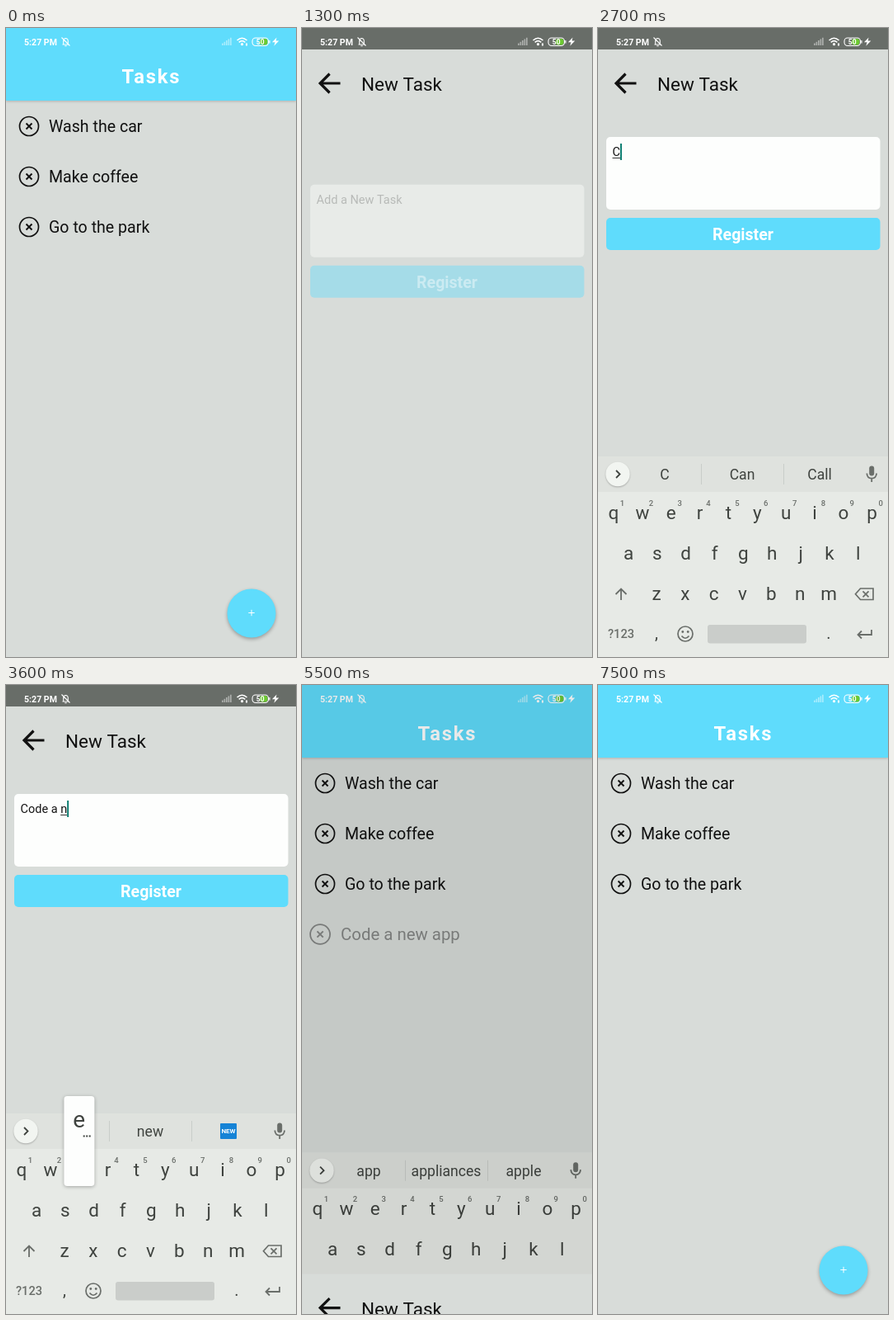
An HTML page with a canvas that plays this animation: 352 by 762 pixels, repeating every 7700 ms.

```html
<!DOCTYPE html>
<html lang="en">
<head>
<meta charset="utf-8">
<title>Tasks</title>
<style>
html, body { margin: 0; width: 100%; height: 100%; overflow: hidden; background: #d8dcd9; }
canvas { display: block; width: 352px; height: 762px; }
</style>
</head>
<body>
<canvas id="stage"></canvas>
<script>
const W = 352, H = 762, LOOP = 7700;
const BLUE = '#5fdcfc', GRAY = '#d8dcd9', INK = '#3f433f', ICON = '#6a6e6a';
const canvas = document.getElementById('stage');
const ctx = canvas.getContext('2d');
const dpr = window.devicePixelRatio || 1;
canvas.width = W * dpr;
canvas.height = H * dpr;

// Timeline, ms
const PUSH = 1080, FOCUS = 1856, TYPE = 2610, KEY_STEP = 122, KEY_HOLD = 90;
const REGISTER = 5150, POP = 5380, REMOVE = 6850;
const MESSAGE = 'Code a new app';
const ROWS = ['qwertyuiop', 'asdfghjkl', 'zxcvbnm'];
const ROW_X = [19, 37, 71], KEY_W = 34.85;
const rowY = row => 587 + row * 49.3;

const SUGGESTIONS = {
  '': ['the', 'new', 'for'],
  C: ['C', 'Can', 'Call'],
  Co: ['Co', 'Come', 'Could'],
  Cod: ['Cod', 'Code', 'Codes'],
  Code: ['Code', 'Codes', 'Coded'],
  a: ['a', 'and', 'as'],
  n: ['n', 'new', '#'],
  ne: ['ne', 'new', 'need'],
  new: ['new', 'news', '#'],
  ap: ['ap', 'app', 'apple'],
  app: ['app', 'appliances', 'apple']
};

const clamp = v => Math.max(0, Math.min(1, v));
const within = (t, from, to) => t >= from && t < to;
function smooth(t, start, duration) {
  const x = clamp((t - start) / duration);
  return x * x * (3 - 2 * x);
}
function inOut(t, start, duration) {
  const x = clamp((t - start) / duration);
  return x < 0.5 ? 2 * x * x : 1 - 2 * (1 - x) ** 2;
}

function layer(alpha, x, y, draw) {
  ctx.save();
  ctx.globalAlpha *= alpha;
  ctx.translate(x, y);
  draw();
  ctx.restore();
}
function text(value, x, y, size, color, { weight = 400, align = 'left', spacing = 0 } = {}) {
  ctx.font = `${weight} ${size}px Roboto, sans-serif`;
  ctx.textAlign = align;
  ctx.letterSpacing = spacing + 'px';
  ctx.fillStyle = color;
  ctx.fillText(value, x, y);
}
function rect(x, y, w, h, color, radius = 0) {
  ctx.fillStyle = color;
  ctx.beginPath();
  ctx.roundRect(x, y, w, h, radius);
  ctx.fill();
}
function disc(x, y, r, color) {
  rect(x - r, y - r, 2 * r, 2 * r, color, r);
}
function stroke(path, color, width) {
  ctx.strokeStyle = color;
  ctx.lineWidth = width;
  ctx.stroke(new Path2D(path));
}
function fill(path, color) {
  ctx.fillStyle = color;
  ctx.fill(new Path2D(path));
}
function ring(x, y, r, color, width) {
  ctx.strokeStyle = color;
  ctx.lineWidth = width;
  ctx.beginPath();
  ctx.arc(x, y, r, 0, 2 * Math.PI);
  ctx.stroke();
}
function shadow(blur, dy, alpha, draw) {
  ctx.save();
  ctx.shadowColor = `rgba(0,0,0,${alpha})`;
  ctx.shadowBlur = blur * dpr;
  ctx.shadowOffsetY = dy * dpr;
  draw();
  ctx.restore();
}

function statusBar() {
  const white = '#fff';
  text('5:27 PM', 22, 20.5, 10.6, white, { weight: 700 });
  stroke('M68.5 20H76.5M69.7 20V16Q69.7 12.7 72.5 12.5Q75.3 12.7 75.3 16V20M71.3 21.7H73.7M67.5 11.5L77.5 21.5', white, 1.1);
  for (let i = 0; i < 5; i++) {
    rect(262 + i * 2.5, 18.5 - i * 1.7, 1.7, 2.5 + i * 1.7, 'rgba(255,255,255,.45)');
  }
  stroke('M280.5 15Q286.5 9.5 292.5 15M282.7 17.3Q286.5 14 290.3 17.3', white, 1.6);
  disc(286.5, 19.7, 1.6, white);
  rect(291, 18.5, 2, 3, white);
  rect(308, 13, 9.5, 7.5, '#6cc930', 3);
  ctx.strokeStyle = white;
  ctx.lineWidth = 1.1;
  ctx.beginPath();
  ctx.roundRect(299, 12, 19.5, 9.5, 4);
  ctx.stroke();
  rect(319.3, 15, 1.2, 3.5, white);
  text('50', 308.7, 20, 8.5, white, { weight: 700, align: 'center' });
  fill('M328.5 11.5L323 17.3H326.6L325.3 21.8L331.3 15.6H327.7Z', white);
}

function taskRow(label, y) {
  ring(28, y, 11.5, '#111', 1.7);
  stroke(`M24.5 ${y - 3.5}l7 7m0 -7l-7 7`, '#111', 1.9);
  text(label, 52, y + 7, 19.6, '#111');
}

function tasksScreen(t) {
  rect(0, 0, W, H, GRAY);
  shadow(3, 1, 0.2, () => rect(0, 0, W, 88, BLUE));
  text('Tasks', 140.6, 67, 23.8, '#fff', { weight: 700, spacing: 1.8 });
  statusBar();
  ['Wash the car', 'Make coffee', 'Go to the park'].forEach((label, i) => taskRow(label, 119 + 61 * i));

  const shown = inOut(t, POP - 40, 350);
  const gone = inOut(t, REMOVE, 250);
  if (shown > 0 && gone < 1) {
    const pressed = within(t, REMOVE - 150, REMOVE + 250) ? 0.3 : 1;
    layer(shown * (1 - gone) * pressed, W / 2, 302, () => {
      const scale = 1 + 0.07 * (1 - shown);
      ctx.scale(scale, scale);
      ctx.translate(-W / 2, 0);
      taskRow(MESSAGE, 0);
    });
  }

  layer(within(t, 880, PUSH + 100) ? 0.2 : 1, 298, 709, () => {
    shadow(4, 2, 0.3, () => disc(0, 0, 29.5, BLUE));
    stroke('M-3.7 -.5H3.7M0 -4.2V3.2', '#fff', 1);
  });
}

function typedState(t) {
  const count = Math.floor((t - TYPE - KEY_HOLD) / KEY_STEP) + 1;
  const typed = MESSAGE.slice(0, Math.max(0, count));
  const next = Math.floor((t - TYPE) / KEY_STEP);
  const held = t >= TYPE && (t - TYPE) % KEY_STEP < KEY_HOLD ? MESSAGE[next] || '' : '';
  return { typed, held, word: typed.split(' ').pop() };
}

function input(t, { typed, word }) {
  rect(10, 132, 332.5, 88, '#fdfefd', 5);
  if (!typed) text('Add a New Task', 17.5, 155, 14.5, '#767976');
  text(typed, 17.5, 155, 14.5, '#151515');
  const end = 17.5 + ctx.measureText(typed).width;
  const start = end - ctx.measureText(word).width;
  if (word) rect(start, 157, end - start, 1, '#333');

  const lastKey = TYPE + KEY_HOLD + KEY_STEP * (MESSAGE.length - 1);
  const typing = within(t, TYPE, lastKey);
  const since = t - (t < TYPE ? FOCUS : lastKey);
  if (t >= FOCUS && (typing || since % 1200 < 600)) rect(end, 140, 2, 20, '#0b7d70');
}

function formScreen(t, state) {
  rect(0, 26, W, H - 26, GRAY);
  stroke('M46.5 67H22M33.5 55.5L22 67L33.5 78.5', '#111', 3.2);
  text('New Task', 72, 76, 22.5, '#111');
  const shown = inOut(t, PUSH + 60, 350);
  layer(shown, 0, 100 * (1 - shown), () => {
    input(t, state);
    layer(t >= REGISTER ? 0.2 : 1, 0, 0, () => {
      rect(10, 230, 332.5, 39, BLUE, 5);
      text('Register', 176, 257, 19.6, '#fff', { weight: 700, align: 'center' });
    });
  });
}

function toolbar() {
  stroke('M62.5 533.5H76.5V543L71.5 548H62.5ZM76 542.5H71.5V548M66 541Q69 545 72 541', ICON, 1.7);
  rect(65.5, 536.5, 2, 2, ICON);
  rect(71.5, 536.5, 2, 2, ICON);
  text('GIF', 119, 545.5, 13.5, ICON, { weight: 900, align: 'center', spacing: 0.8 });
  ring(169.5, 540.5, 4.8, ICON, 3.6);
  for (let i = 0; i < 6; i++) {
    layer(1, 169.5, 540.5, () => {
      ctx.rotate(i * Math.PI / 3);
      rect(-2, -8.5, 4, 4, ICON);
    });
  }
  rect(212, 533, 16, 16, ICON, 1.5);
  rect(250, 530, 1, 21, '#c3c7c3');
  [-6.5, 0, 6.5].forEach(dx => disc(282 + dx, 540.5, 2, ICON));
}

function suggestions(word) {
  [125, 225].forEach(x => rect(x, 528, 1, 25, '#c9cdc9'));
  (SUGGESTIONS[word] || []).forEach((label, i) => {
    const x = 81 + 94 * i;
    if (label === '#') {
      rect(x - 9, 531, 20, 19, '#1583d6', 1);
      text('NEW', x + 1, 543.3, 8, '#fff', { weight: 700, align: 'center' });
    } else {
      text(label, x, 547, 17.6, INK, { align: 'center' });
    }
  });
}

function keyPopup(key) {
  const row = ROWS.findIndex(keys => keys.includes(key.toLowerCase()));
  if (row < 0) return;
  const x = ROW_X[row] + KEY_W * ROWS[row].indexOf(key.toLowerCase());
  const y = rowY(row);
  shadow(4, 1, 0.3, () => rect(x - 18.3, y - 89, 37, 109, '#fdfefd', 4));
  text(key, x, y - 51, 28, INK, { align: 'center' });
  [6, 9.5, 13].forEach(dx => rect(x + dx - 1, y - 41.5, 2, 2, INK));
}

function keyboard({ typed, held, word }) {
  const upper = !typed;
  rect(0, 519, W, H - 519, '#e7eae6');
  rect(0, 519, W, 43, '#dfe2de');
  shadow(2, 1, 0.25, () => disc(24, 540.5, 14.7, '#f2f5f1'));
  stroke(upper ? 'M26.5 536L22 540.5L26.5 545' : 'M22 536L26.5 540.5L22 545', INK, 1.8);
  if (upper) toolbar();
  else suggestions(word);
  rect(329.2, 530.5, 6, 12, ICON, 3);
  stroke('M326.3 539.5Q326.7 545.5 332.2 545.7Q337.7 545.5 338.1 539.5M332.2 545.5V550', ICON, 1.8);

  ROWS.forEach((keys, row) => [...keys].forEach((key, i) => {
    const x = ROW_X[row] + KEY_W * i;
    text(upper ? key.toUpperCase() : key, x, rowY(row) + (upper ? 8 : 7.5), 22.5, INK, { align: 'center' });
    if (row === 0) text((i + 1) % 10, x + 10.5, 578.5, 9.5, ICON, { weight: 500, align: 'center' });
  }));

  stroke('M28 693V680M21.5 686L28 679.5L34.5 686', ICON, 1.8);
  stroke('M318.5 679H334V692.5H318.5L312.5 685.8ZM321.5 682.3l7 7m0 -7l-7 7', ICON, 1.7);
  text('?123', 12, 739, 14.6, ICON, { weight: 500 });
  text(',', 71, 740, 20, INK, { align: 'center' });
  ring(106, 734, 9, ICON, 1.7);
  disc(102.8, 731.5, 1.4, ICON);
  disc(109.2, 731.5, 1.4, ICON);
  stroke('M101.5 736.5Q106 742 110.5 736.5', ICON, 1.7);
  rect(133, 723, 120, 22.5, '#cacdca', 3);
  text('.', 280, 740, 20, INK, { align: 'center' });
  stroke('M332 729V735H315.5M320 730.5L315.5 735L320 739.5', ICON, 1.8);
  if (held) keyPopup(held);
}

function draw(t) {
  ctx.setTransform(dpr, 0, 0, dpr, 0, 0);
  const state = typedState(t);
  const open = smooth(t, PUSH, 200) - smooth(t, POP, 150);
  const raised = smooth(t, FOCUS, 250) - smooth(t, POP + 50, 250);
  const showKeyboard = () => layer(1, 0, 243 * (1 - raised), () => keyboard(state));
  const leaving = t >= POP;

  if (open < 1) {
    tasksScreen(t);
    if (leaving && raised > 0) showKeyboard();
    const dim = t < POP ? smooth(t, PUSH, 100) : 1 - smooth(t, POP + 130, 90);
    rect(0, 0, W, H, `rgba(0,0,0,${0.085 * dim})`);
  }
  if (open > 0) {
    layer(1, 0, H * (1 - open), () => formScreen(t, state));
  }
  if (within(t, PUSH + 60, POP)) {
    rect(0, 0, W, 26, '#686d68');
    statusBar();
  }
  if (!leaving && t >= FOCUS) {
    rect(0, 519, W, H - 519, '#787d78');
    showKeyboard();
  }
}

function tick() {
  draw(performance.now() % LOOP);
  requestAnimationFrame(tick);
}
tick();
</script>
</body>
</html>
```
